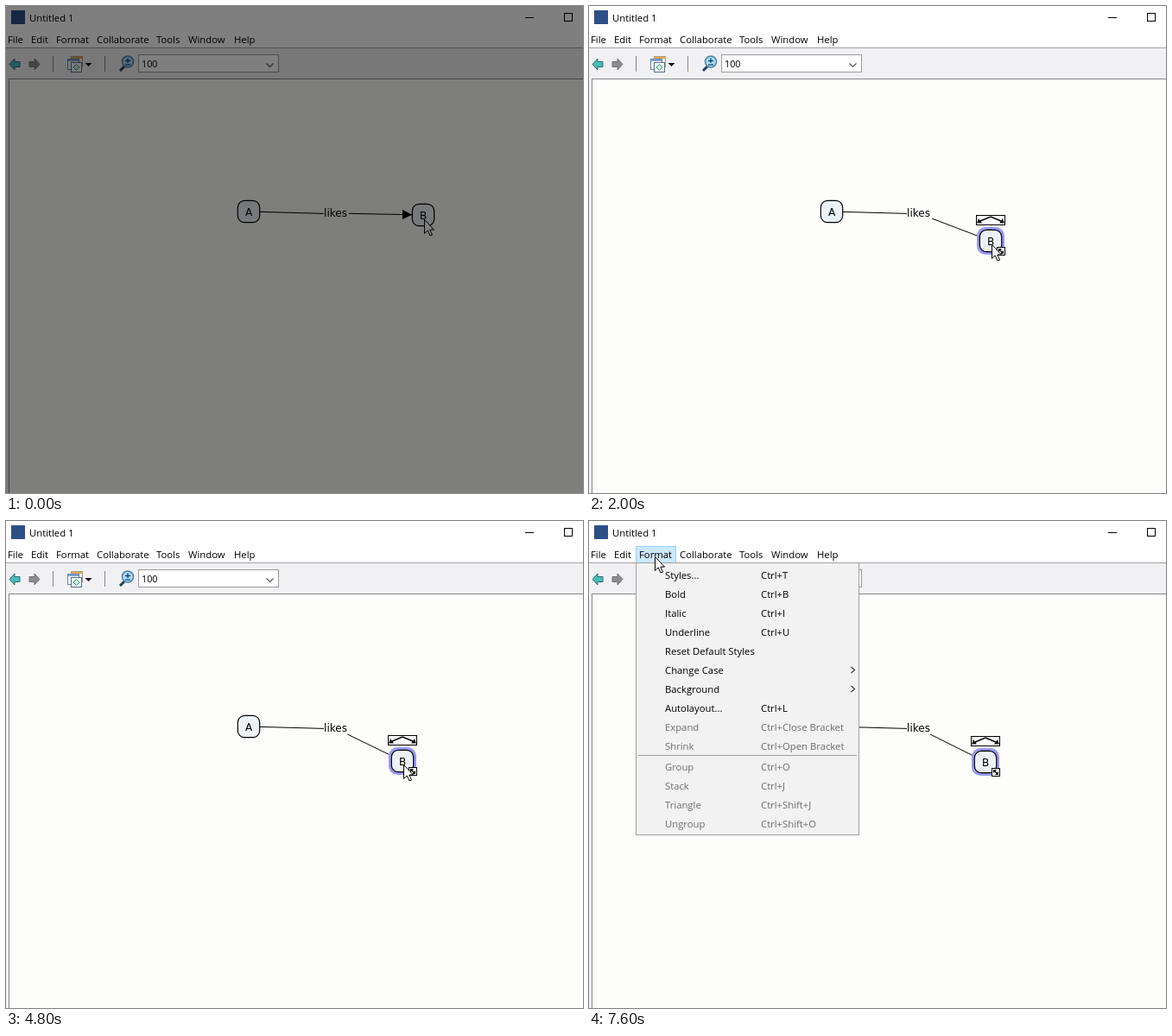
Recreate the animation shown at these times as an HTML page with a canvas. Size 668 by 564 pixels, loop 8000 ms.

```html
<!DOCTYPE html>
<html lang="en">
<head>
<meta charset="utf-8">
<title>Concept map editor</title>
<style>
  html, body { margin: 0; width: 100%; height: 100%; overflow: hidden; background: #fdfdfc; }
  canvas { display: block; }
</style>
</head>
<body>
<canvas id="stage" width="668" height="564"></canvas>
<script>
const ctx = document.getElementById('stage').getContext('2d');
const LOOP = 8000, STEP = 200;
const UI = '11.3px "Open Sans", "Noto Sans", sans-serif';
const MAP = '12px "DejaVu Sans", sans-serif';

// Waypoints: [time, x, y]
const nodePath = [
  [0, 483, 242], [400, 483, 242], [1600, 469, 266], [2000, 465, 272], [2200, 465, 272],
  [2600, 468, 272], [3200, 462, 276], [3400, 462, 276], [4000, 466, 273],
  [4800, 459, 278], [5200, 459, 278], [5400, 459, 279]
];
const pointerPath = [
  [5600, 460, 283], [6000, 330, 262], [6200, 189, 243], [6600, 96, 95], [6800, 76, 51], [7000, 76, 41]
];
const NODE_A = [281, 238], LABEL = [381, 240];

const menuBar = [['File', 2], ['Edit', 29], ['Format', 58], ['Collaborate', 105], ['Tools', 174], ['Window', 211], ['Help', 264]];
const menuItems = [
  ['Styles...', 'Ctrl+T'], ['Bold', 'Ctrl+B'], ['Italic', 'Ctrl+I'], ['Underline', 'Ctrl+U'],
  ['Reset Default Styles', ''], ['Change Case', '>'], ['Background', '>'], ['Autolayout...', 'Ctrl+L'],
  ['Expand', 'Ctrl+Close Bracket'], ['Shrink', 'Ctrl+Open Bracket'],
  ['Group', 'Ctrl+O'], ['Stack', 'Ctrl+J'], ['Triangle', 'Ctrl+Shift+J'], ['Ungroup', 'Ctrl+Shift+O']
];

function along(path, t) {
  const next = path.findIndex(p => p[0] > t);
  if (next === 0) return path[0].slice(1);
  if (next < 0) return path[path.length - 1].slice(1);
  const a = path[next - 1], b = path[next], k = (t - a[0]) / (b[0] - a[0]);
  return [1, 2].map(i => Math.round(a[i] + (b[i] - a[i]) * k));
}

function rect(x, y, w, h, fill, stroke) {
  if (fill) { ctx.fillStyle = fill; ctx.fillRect(x, y, w, h); }
  if (stroke) {
    ctx.strokeStyle = stroke;
    ctx.lineWidth = 1;
    ctx.strokeRect(x + .5, y + .5, w - 1, h - 1);
  }
}

function line(points, color = '#000', width = 1) {
  ctx.beginPath();
  points.forEach(p => ctx.lineTo(p[0], p[1]));
  ctx.strokeStyle = color;
  ctx.lineWidth = width;
  ctx.stroke();
}

function poly(points, fill, stroke) {
  ctx.beginPath();
  points.forEach(p => ctx.lineTo(p[0], p[1]));
  ctx.closePath();
  ctx.fillStyle = fill;
  ctx.fill();
  if (stroke) { ctx.strokeStyle = stroke; ctx.lineWidth = 1; ctx.stroke(); }
}

function rounded(cx, cy, size, radius, fill, stroke) {
  ctx.beginPath();
  ctx.roundRect(cx - size / 2, cy - size / 2, size, size, radius);
  ctx.fillStyle = fill;
  ctx.fill();
  if (stroke) { ctx.strokeStyle = stroke; ctx.lineWidth = 1.2; ctx.stroke(); }
}

function text(s, x, y, font = UI, color = '#000', align = 'left') {
  ctx.font = font;
  ctx.fillStyle = color;
  ctx.textAlign = align;
  ctx.fillText(s, x, y);
}

function toolArrow(x, dir, fill, stroke) {
  const shape = [[0, 0], [6, -6.5], [6, -3], [12, -3], [12, 3], [6, 3], [6, 6.5]];
  poly(shape.map(([dx, dy]) => [x + dx * dir, 67.5 + dy]), fill, stroke);
}

function toolbarIcons() {
  toolArrow(4, 1, '#48bcb4', '#2b6f78');
  toolArrow(39, -1, '#8c8c8e', '#757577');
  rect(54, 58, 1, 18, '#85858a');
  rect(114, 58, 1, 18, '#85858a');

  rect(75, 58, 14, 13, '#f4f1e8', '#b59a72');
  rect(76, 59, 12, 2, '#e0a95c');
  rect(71, 61, 14, 13, '#f5f8fc', '#6685ad');
  rect(72, 62, 12, 2, '#7fa4d2');
  rect(75, 65, 13, 12, '#f7fcfb', '#53718f');
  poly([[81.5, 67.5], [85, 71], [81.5, 74.5], [78, 71]], '#d4f2df', '#2f9480');
  poly([[91.5, 66], [99.5, 66], [95.5, 70]], '#111');

  line([[137, 70], [132, 75]], '#253f63', 3);
  ctx.beginPath();
  ctx.arc(141, 64.5, 6.5, 0, Math.PI * 2);
  ctx.fillStyle = '#a9dcf2';
  ctx.fill();
  ctx.strokeStyle = '#4a80ac';
  ctx.lineWidth = 1.5;
  ctx.stroke();
  line([[138, 63.5], [144, 63.5]], '#173a68', 1.3);
  line([[141, 60.5], [141, 66]], '#173a68', 1.3);
  line([[138, 68], [144, 68]], '#173a68', 1.2);
}

function windowFrame(hover) {
  rect(0, 0, 668, 564, '#fdfdfc');
  rect(0, 0, 668, 48, '#fff');
  rect(0, 49, 668, 36, '#f1f1f3');
  rect(0, 84, 3, 480, '#f0f0f1');
  rect(0, 48, 668, 1, '#a2a2a4');
  rect(3, 84, 665, 1, '#828790');
  rect(3, 84, 1, 480, '#828790');

  rect(6, 5, 16, 16, '#2c4f88');
  text('Untitled 1', 27, 18);
  rect(601, 13, 10, 1, '#000');
  rect(646, 8, 10, 10, null, '#000');

  if (hover) rect(54, 29, 47, 20, '#cce8ff', '#99d1ff');
  menuBar.forEach(([name, x]) => text(name, x, 43));

  toolbarIcons();
  rect(153, 56, 163, 21, '#fff', '#999a9c');
  text('100', 157, 71, '10.8px "Open Sans", "Noto Sans", sans-serif');
  line([[301.5, 66.5], [305.5, 70.5], [309.5, 66.5]], '#555', 1.1);
}

function node(name, [x, y]) {
  rounded(x, y, 25.4, 8, '#edf2f7', '#000');
  text(name, x, y + 4.5, MAP, '#000', 'center');
}

function selection([x, y]) {
  rounded(x, y, 32, 10, '#9b99f0');
  rect(x - 17, y - 30, 34, 12, '#fff', '#000');
  for (const side of [-1, 1]) {
    line([[x, y - 28], [x + side * 13, y - 22.5]], '#111', 1.9);
    poly([[x + side * 16, y - 20.5], [x + side * 14, y - 26], [x + side * 10, y - 20.5]], '#111');
  }
}

function resizeHandle([x, y]) {
  rect(x + 7, y + 7, 10, 10, '#fff', '#000');
  line([[x + 10, y + 10], [x + 14, y + 14]], '#000', 1.3);
  poly([[x + 9, y + 9], [x + 13, y + 9], [x + 9, y + 13]], '#000');
  poly([[x + 15, y + 15], [x + 11, y + 15], [x + 15, y + 11]], '#000');
}

function conceptMap(pos, selected) {
  const [lx, ly] = LABEL, dx = pos[0] - lx, dy = pos[1] - ly;
  const exit = Math.min(16 / Math.abs(dx), 7 / Math.abs(dy));
  line([NODE_A, [368, 240.4]]);
  line([[lx + dx * exit, ly + dy * exit], pos]);
  text('likes', lx + .5, 244, MAP, '#000', 'center');
  node('A', NODE_A);

  // Downward links carry no arrowhead
  if (dy < 8) {
    ctx.save();
    ctx.translate(pos[0] - 13, pos[1] - 13 * dy / dx);
    ctx.rotate(Math.atan2(dy, dx));
    poly([[0, 0], [-11, -5.5], [-11, 5.5]], '#000');
    ctx.restore();
  }
  if (selected) selection(pos);
  node('B', pos);
  if (selected) resizeHandle(pos);
}

function formatMenu() {
  rect(54, 48, 259, 316, '#f2f2f3', '#a0a0a2');
  rect(57, 271, 253, 1, '#a0a0a2');
  menuItems.forEach(([name, key], i) => {
    const y = 67 + i * 22 + (i > 9 ? 2 : 0), color = i > 7 ? '#6d6d6d' : '#000';
    text(name, 88, y, UI, color);
    if (key === '>') line([[303.5, y - 8], [307.5, y - 4.5], [303.5, y - 1]], '#333', 1.1);
    else text(key, 199, y, UI, color);
  });
}

function pointer([x, y]) {
  const shape = [[0, 0], [0, 16], [3.7, 12.5], [6.5, 18.5], [9, 17.5], [6.3, 11.6], [11, 11.6]];
  poly(shape.map(([dx, dy]) => [x + dx + .5, y + dy + .5]), '#fff', '#000');
}

function draw(time) {
  const t = Math.floor((time % LOOP) / STEP) * STEP;
  const pos = along(nodePath, t);
  windowFrame(t >= 7400);
  conceptMap(pos, t >= 600);
  if (t >= 7600) formatMenu();
  pointer(t < 5600 ? [pos[0] + 1, pos[1] + (t < 600 ? 5 : 4)] : along(pointerPath, t));
  if (t < 200) rect(0, 0, 668, 564, 'rgba(0, 0, 0, .5)');
}

const start = performance.now();
function tick() {
  draw(performance.now() - start);
  requestAnimationFrame(tick);
}
tick();
</script>
</body>
</html>
```
